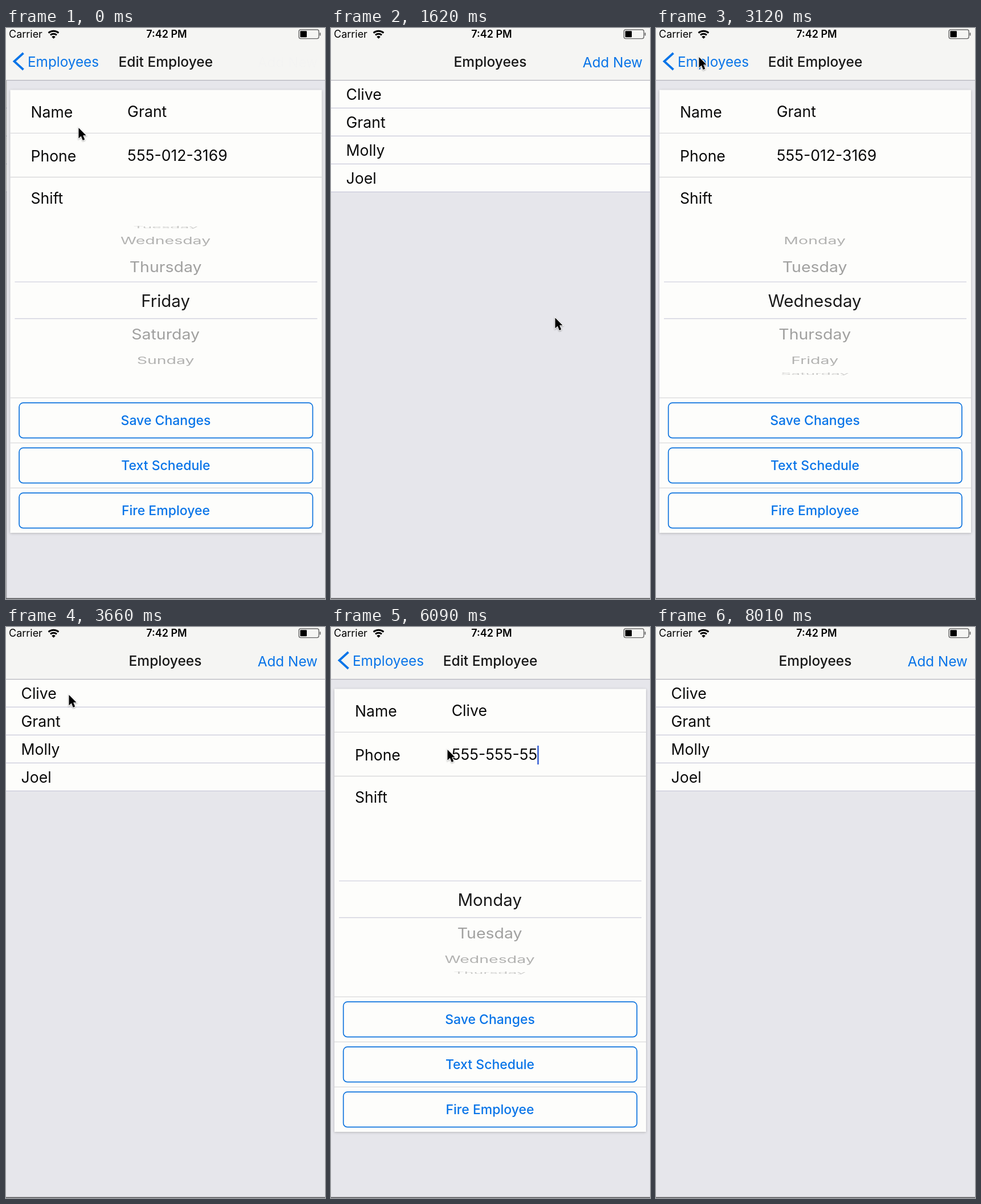
These frames come from a looping animation (560x1001 px, 8130 ms). An HTML page:

```html
<!DOCTYPE html>
<html lang="en">
<head>
<meta charset="utf-8">
<title>Employee editor</title>
<style>
  html, body { margin: 0; width: 100%; height: 100%; overflow: hidden; background: #e6e6eb; }
  svg { display: block; width: 560px; height: 1001px; font-family: Inter, Roboto, sans-serif; white-space: pre; }
  .page { fill: #e6e6eb; }
  .body { font-size: 26.6px; fill: #0a0a0a; }
  .title { font-size: 24.5px; font-weight: 500; fill: #181818; text-anchor: middle; }
  .link { font-size: 24.3px; fill: #0874e8; }
  .button text { font-size: 23px; font-weight: 500; fill: #0874e8; text-anchor: middle; }
  .button rect { fill: none; stroke: #0f74de; stroke-width: 1.7; }
  .wheel { text-anchor: middle; fill: #1a1a1a; }
  .card { fill: #fdfdfb; filter: drop-shadow(0 1px 2px rgba(0, 0, 0, .22)); }
  .rule { stroke: #d9d9dc; stroke-width: 1.3; }
  .row { stroke: #c8c8da; stroke-width: 1.3; }
  .lens { stroke: #d2d2df; stroke-width: 1.3; }
</style>
</head>
<body>
<svg viewBox="0 0 560 1001">
  <defs>
    <linearGradient id="shade">
      <stop offset="0" stop-opacity="0"/><stop offset="1" stop-opacity=".18"/>
    </linearGradient>
    <clipPath id="around"><path d="M6 320H553V445H6ZM6 510H553V647H6Z"/></clipPath>
    <clipPath id="middle"><path d="M6 446H553V509H6Z"/></clipPath>
  </defs>

  <g id="list">
    <rect class="page" width="560" height="1001"/>
    <rect y="92" width="560" height="195" fill="#fdfdfb"/>
    <g id="rows" class="body"></g>
  </g>
  <rect id="dim" y="92" width="560" height="909"/>

  <g id="form">
    <rect x="-12" y="92" width="12" height="909" fill="url(#shade)"/>
    <rect class="page" y="92" width="560" height="909"/>
    <rect class="card" x="6" y="108.5" width="547" height="776.5"/>
    <path class="rule" d="M6 184.3H553M6 261.5H553M6 648.3H553M6 727.3H553M6 806.3H553"/>
    <g class="body">
      <text x="42" y="157">Name</text><text id="name" x="211.7" y="156"></text>
      <text x="42" y="234">Phone</text><text id="phone" x="211.7" y="233"></text>
      <text x="42" y="308">Shift</text>
    </g>
    <rect id="caret" y="208" width="2.6" height="33" fill="#3d64d4"/>
    <path class="lens" d="M14 445.2H545M14 509.5H545"/>
    <g class="wheel" id="outer" clip-path="url(#around)" font-size="28.5"></g>
    <g class="wheel" id="inner" clip-path="url(#middle)" font-size="29.5"></g>
    <g class="button" id="buttons"></g>
  </g>

  <rect width="560" height="91.5" fill="#f5f5f3"/>
  <path d="M0 91.7H560" stroke="#b4b4bd" stroke-width="1.3"/>
  <text id="listTitle" class="title" x="279.5" y="68">Employees</text>
  <text id="formTitle" class="title" x="279.5" y="68">Edit Employee</text>
  <text id="add" class="link" x="547" y="69" text-anchor="end">Add New</text>
  <g id="back">
    <path d="M30.5 44L14.5 58.5L30.5 73" fill="none" stroke="#0874e8" stroke-width="3.8"/>
    <text class="link" x="38" y="68">Employees</text>
  </g>

  <text x="5" y="17" font-size="18">Carrier</text>
  <text x="282" y="17" font-size="18" font-weight="600" text-anchor="middle">7:42 PM</text>
  <g fill="none" stroke="#000" stroke-width="3">
    <path d="M74.6 8.6A13.5 13.5 0 0 1 92.4 8.6M78 12.4A8.4 8.4 0 0 1 89 12.4"/>
    <path d="M83.5 18.8L80.2 15.4A4.8 4.8 0 0 1 86.8 15.4Z" fill="#000" stroke="none"/>
  </g>
  <rect x="514.2" y="3" width="35" height="15.6" rx="3" fill="none" stroke="#666" stroke-width="1.4"/>
  <rect x="516.5" y="5.3" width="11.5" height="11" rx="1"/>
  <rect x="550.6" y="8" width="1.8" height="5.6" rx=".9" fill="#666"/>
  <rect y="999.4" width="560" height="1.6" fill="#5a5a5e"/>

  <path id="cursor" d="M.5 1V19.5L4.8 15.5L7.8 23L11.2 21.6L8.2 14.3H13.6Z" stroke="#fff" stroke-width="2"
        paint-order="stroke" style="filter:drop-shadow(0 1px 1px rgba(0,0,0,.35))"/>
</svg>
<script>
const LOOP = 8130, SLIDE = 320, W = 560, STEP = 27 * Math.PI / 180;
const $ = id => document.getElementById(id);
const clamp = v => Math.min(1, Math.max(0, v));
const smooth = v => v * v * (3 - 2 * v);

const people = ["Clive", "Grant", "Molly", "Joel"];
const days = ["Monday", "Tuesday", "Wednesday", "Thursday", "Friday", "Saturday", "Sunday"];
const grantPhone = "555-012-3169", clivePhone = "555-036-8842", newPhone = "555-555-5555";

// [start, 1 = form slides in, 0 = form slides out]
const slides = [[-247, 1], [1150, 0], [2500, 1], [3180, 0], [3700, 1], [6725, 0], [7101, 1], [7590, 0]];

// [time, x, y] of the pointer
const path = [
  [0, 127, 174], [60, 127, 174], [350, 325, 430], [420, 325, 430], [740, 328, 548], [860, 328, 548],
  [1080, 345, 690], [1220, 345, 690], [1620, 393, 507], [1760, 393, 507], [2330, 120, 160], [2560, 120, 160],
  [3020, 75, 50], [3220, 75, 50], [3560, 110, 118], [3760, 110, 118], [4180, 407, 219], [4380, 407, 219],
  [4720, 204, 214], [6260, 204, 214], [6620, 285, 690], [6750, 285, 690], [7060, 119, 115], [7240, 119, 115],
  [7500, 75, 50], [7660, 75, 50], [7960, -30, 40]
];

$("rows").innerHTML = people.map((p, i) => {
  const y = 140.3 + 49 * i;
  return `<text x="26.5" y="${y - 14.3}">${p}</text><path class="row" d="M0 ${y}H560"/>`;
}).join("");

$("buttons").innerHTML = ["Save Changes", "Text Schedule", "Fire Employee"].map((label, i) => {
  const y = 657.2 + 79 * i;
  return `<rect x="21.7" y="${y}" width="515.3" height="61.5" rx="7"/><text x="279" y="${y + 39}">${label}</text>`;
}).join("");

for (const id of ["outer", "inner"])
  $(id).innerHTML = days.map(d => `<text y="10.6">${d}</text>`).join("");

function slideAt(t) {
  const [start, into] = slides.filter(s => s[0] <= t).pop();
  const rest = (1 - clamp((t - start) / SLIDE)) ** 4;
  return into ? 1 - rest : rest;
}

function pointerAt(t) {
  const i = path.findIndex(k => k[0] > t);
  if (i < 0) return path[path.length - 1].slice(1);
  const [t0, x0, y0] = path[i - 1], [t1, x1, y1] = path[i];
  const k = smooth((t - t0) / (t1 - t0));
  return [x0 + (x1 - x0) * k, y0 + (y1 - y0) * k];
}

function phoneAt(t) {
  if (t < 3600) return grantPhone;
  if (t < 5250) return clivePhone.slice(0, Math.max(0, 12 - Math.max(0, Math.floor((t - 4750) / 35))));
  return newPhone.slice(0, Math.floor((t - 5250) / 82));
}

function turnWheel(pos) {
  days.forEach((_, i) => {
    const a = (i - pos) * STEP, c = Math.cos(a);
    for (const id of ["outer", "inner"]) {
      const el = $(id).children[i];
      el.setAttribute("display", Math.abs(a) < Math.PI / 2 ? "inline" : "none");
      el.setAttribute("transform", `translate(278.7 ${478 + 130 * Math.sin(a)}) scale(1 ${Math.max(c, .01)})`);
      el.setAttribute("opacity", id === "inner" ? 1 : .18 + .25 * c);
    }
  });
}

const shift = (id, x, y = 0) => $(id).setAttribute("transform", `translate(${x} ${y})`);
const fade = (id, o) => $(id).setAttribute("opacity", o);

function draw(t) {
  const q = slideAt(t), first = t < 3600;
  shift("list", -.3 * W * q);
  fade("dim", .18 * q);
  shift("form", W * (1 - q));
  $("form").setAttribute("display", q > 0 ? "inline" : "none");
  shift("listTitle", -299 * q);
  fade("listTitle", 1 - q);
  shift("formTitle", 299 * (1 - q));
  fade("formTitle", q);
  fade("add", 1 - q);
  fade("back", clamp(2 * q - 1));

  $("name").textContent = first ? people[1] : people[0];
  const phone = $("phone");
  phone.textContent = phoneAt(t);
  const typing = t >= 4230 && t < 6725;
  $("caret").setAttribute("x", 211.5 + (phone.textContent ? phone.getComputedTextLength() : 0));
  fade("caret", typing ? 1 : 0);

  turnWheel(first ? 4 - 2 * smooth(clamp((t - 420) / 430)) : 0);
  shift("cursor", ...pointerAt(t));
}

function tick() {
  draw(performance.now() % LOOP);
  requestAnimationFrame(tick);
}
tick();
</script>
</body>
</html>
```
